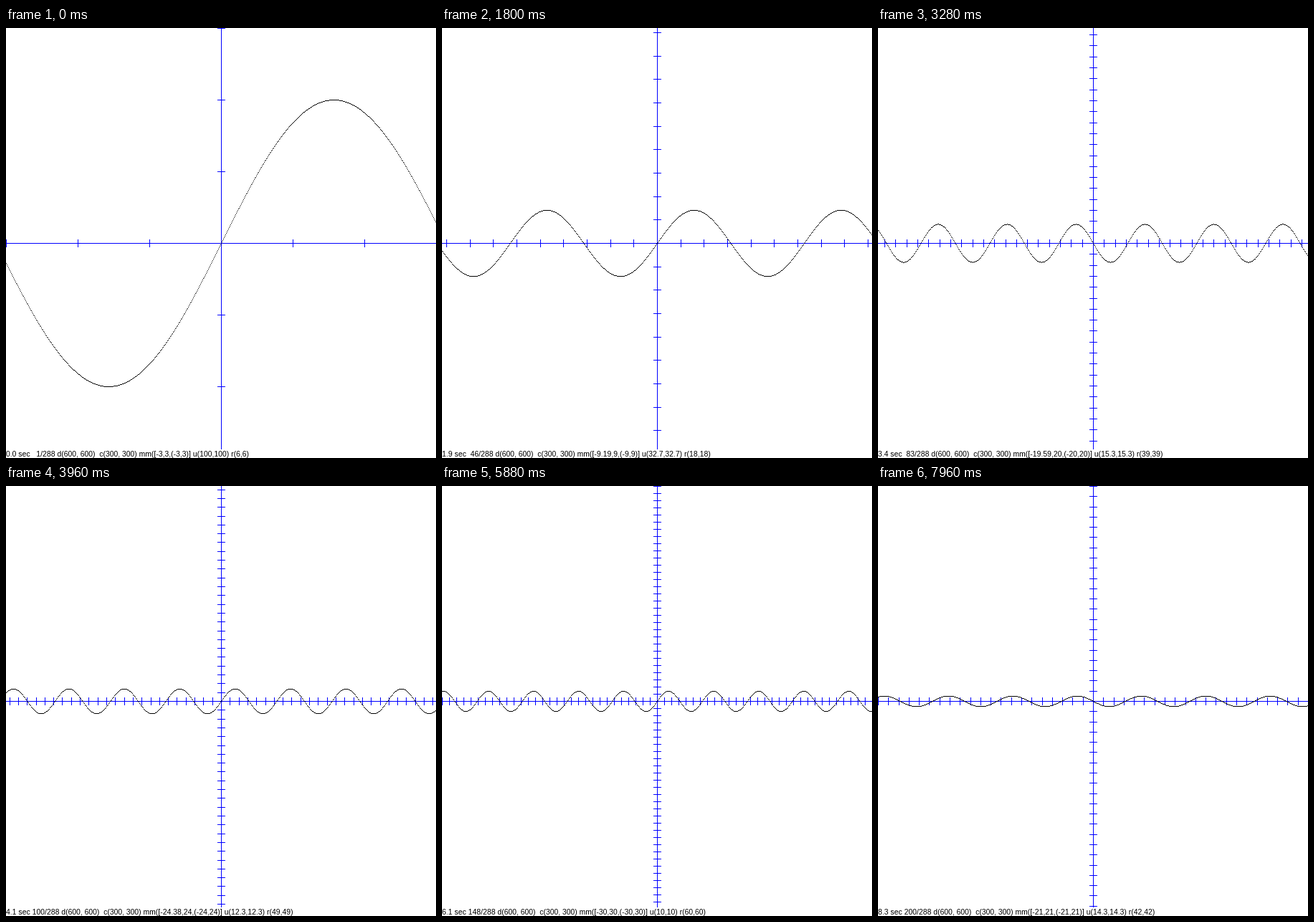
A matplotlib script that plays this animation: 600x600 px, repeating every 8000 ms.

```python
import math

import numpy as np
import matplotlib.pyplot as plt
from matplotlib.animation import FuncAnimation

SIZE = 600
MID = SIZE // 2
FPS = 24
TOTAL = 288          # length of the full zoom cycle, shown in the caption
FRAMES = 200
INTERVAL = 40
TICK = 5             # half length of a tick mark
CAPTION_TOP = 588

BLUE = (0, 0, 255)
BLACK = (0, 0, 0)
WHITE = 255


def half_up(value, digits=0):
    scale = 10 ** digits
    return math.floor(value * scale + 0.5) / scale


def half_range(num):
    """Units from the centre to the edge: 3, zoom out to 30, hold, zoom in."""
    return np.interp(num, [24, 120, 168, 264], [3, 30, 30, 3])


def caption(num, half):
    seconds = (num - 1) / FPS
    whole = half_up(half)
    unit = half_up(MID / half, 1)
    span = half_up(2 * half)
    return (f"{seconds:.1f} sec {num:3d}/{TOTAL} d({SIZE}, {SIZE})  "
            f"c({MID}, {MID}) "
            f"mm([-{half_up(half, 2):g},{whole:g},(-{whole:g},{whole:g})] "
            f"u({unit:g},{unit:g}) r({span:g},{span:g})")


def draw_axes(canvas, unit):
    canvas[MID, :] = BLUE
    canvas[:, MID] = BLUE
    count = int(MID / unit + 1e-9)
    for k in range(-count, count + 1):
        pos = int(half_up(MID + k * unit))
        if 0 <= pos < SIZE:
            canvas[MID - TICK:MID + TICK + 1, pos] = BLUE
            canvas[pos, MID - TICK:MID + TICK + 1] = BLUE


def draw_wave(canvas, unit, amp):
    cols = np.arange(SIZE)
    height = unit * amp * np.sin((cols - MID) / unit)
    rows = np.floor(MID - height + 0.5).astype(int)
    canvas[rows, cols] = BLACK


def render(num):
    unit = MID / half_range(num)
    amp = 2 * math.cos(2 * math.pi * (num - 1) / FPS)
    canvas = np.full((SIZE, SIZE, 3), WHITE, dtype=np.uint8)
    draw_axes(canvas, unit)
    draw_wave(canvas, unit, amp)
    canvas[CAPTION_TOP:] = WHITE
    return canvas


fig = plt.figure(figsize=(6, 6), dpi=100, facecolor="white")
image = fig.figimage(render(1), origin="upper")
label = fig.text(0, 2 / SIZE, "", family="Liberation Sans",
                 fontsize=10.4 * 72 / 100, color="black",
                 ha="left", va="baseline")


def update(i):
    num = i + 1
    image.set_data(render(num))
    label.set_text(caption(num, half_range(num)))
    return image, label


anim = FuncAnimation(fig, update, frames=FRAMES, interval=INTERVAL,
                     repeat=True, repeat_delay=0, blit=False)
plt.show()
```
